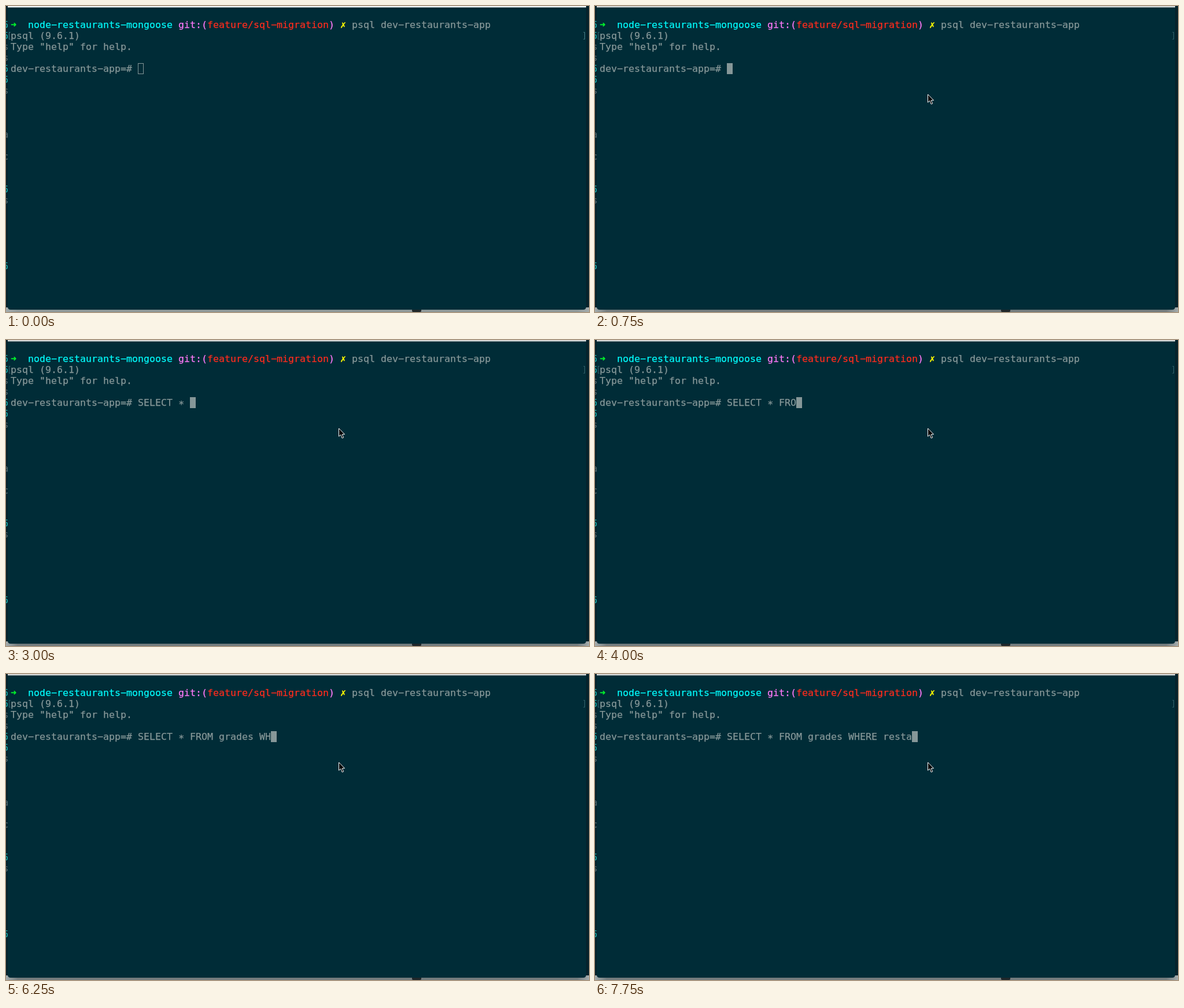
An HTML page that plays this animation: 1008x530 px, repeating every 8000 ms.

```html
<!DOCTYPE html>
<html lang="en">
<head>
<meta charset="utf-8">
<title>Terminal query</title>
<style>
  html, body { margin: 0; width: 100%; height: 100%; overflow: hidden; background: #06222b; }
  svg { display: block; width: 100%; height: 100%; }
  text {
    font: 16.61px "DejaVu Sans Mono", "Liberation Mono", monospace;
    white-space: pre;
    fill: currentColor;
    stroke: currentColor;
    stroke-width: 0.25px;
  }
</style>
</head>
<body>
<svg id="stage" viewBox="0 0 1008 530" preserveAspectRatio="none">
  <linearGradient id="shade">
    <stop offset="0" stop-color="#a4acad"/>
    <stop id="shadeLeft" offset="0.02"/>
    <stop id="shadeRight" offset="0.98"/>
    <stop offset="1" stop-color="#a4acad"/>
  </linearGradient>
</svg>
<script>
const LOOP = 8000;
const LEFT = 8, TOP = 23, CELL = 10, ROW = 19, BASELINE = 15;
const GREY = "#869798", CYAN = "#00fbfb", PINK = "#ff78f8";
const PROMPT = "dev-restaurants-app=# ";
const QUERY = "SELECT * FROM grades WHERE resta";

// Each burst: start time, then the typed length after every 250 ms tick.
const BURSTS = [
  [1250, 1, 2, 4, 5, 6],
  [2500, 7, 8, 9],
  [3750, 11, 12, 14, 15, 17],
  [5000, 18, 20, 21],
  [6250, 23, 25, 27, 29, 31],
  [7500, 32]
];
const POINTER_AT = 250, FOCUS_AT = 500;

const byId = id => document.getElementById(id);
const stage = byId("stage");

function setAttrs(el, attrs) {
  for (const key in attrs) el.setAttribute(key, attrs[key]);
}

function add(tag, attrs, content = "") {
  const el = document.createElementNS("http://www.w3.org/2000/svg", tag);
  setAttrs(el, attrs);
  el.textContent = content;
  return stage.appendChild(el);
}

const box = (x, y, width, height, fill, more) =>
  add("rect", { x, y, width, height, fill, ...more });

// The terminal face has wide dashes and a centred asterisk.
const glyphs = s => s.replace(/-/g, "\u2212").replace(/\*/g, "\u2217");

const put = (col, row, content, color = GREY) => add("text", {
  x: LEFT + col * CELL,
  y: TOP + row * ROW + BASELINE,
  color
}, glyphs(content));

const sliver = (row, content, color) =>
  add("text", { x: -5.5, y: TOP + row * ROW + BASELINE, color }, content);

// Slivers of the windows behind
box(0, 0, 1008, 530, "#06222b");
for (const row of [0, 1, 4, 5, 15, 22]) sliver(row, "5", "#17a5a5");
for (const row of [2, 3, 6, 16]) sliver(row, "s", "#4d6469");
sliver(10, "a", "#4d6469");
sliver(12, "c", "#4d6469");
box(0, 522, 1008, 8, "url(#shade)");
box(702, 524, 16, 6, "#20272a", { rx: 2 });

// Terminal window
add("path", { d: "M3 0H1003V521Q1003 526 998 526H8Q3 526 3 521Z", fill: "#002c37" });
const titleEdge = box(3, 0, 1000, 2.5, "none");
const marks = add("path", {
  d: "M7.5 45.5H5.5V57.5H7.5M998.5 45.5H1000.5V57.5H998.5",
  fill: "none"
});

put(0, 0, "➜", "#00f52c");
put(3, 0, "node-restaurants-mongoose", CYAN);
put(29, 0, "git:(", PINK);
put(34, 0, "feature/sql-migration", "#ff2c1e");
put(55, 0, ")", PINK);
put(57, 0, "✗", "#fffb00");
put(59, 0, "psql dev-restaurants-app");
put(0, 1, "psql (9.6.1)");
put(0, 2, 'Type "help" for help.');
put(0, 4, PROMPT);
const typed = put(PROMPT.length, 4, "");

const caret = box(0, 0, 0, 0, "none", { stroke: GREY });
const pointer = add("path", {
  d: "M575.5 153V167L578.7 164L581.2 170L583.6 169L581.2 163.3H585.5Z",
  fill: "#000", stroke: "#fff", "stroke-width": 1, "stroke-linejoin": "round"
});

function typedLength(t) {
  let length = 0;
  for (const [start, ...counts] of BURSTS) {
    if (t < start) break;
    length = counts[Math.min(counts.length - 1, Math.floor((t - start) / 250))];
  }
  return length;
}

function draw(t) {
  const focused = t >= FOCUS_AT;
  const length = typedLength(t);
  const inset = focused ? 0 : 0.5;
  const shade = focused ? "#737b7d" : "#8e9899";

  typed.textContent = glyphs(QUERY.slice(0, length));
  setAttrs(caret, {
    x: LEFT + (PROMPT.length + length) * CELL + inset,
    y: TOP + 4 * ROW + inset,
    width: CELL - 2 * inset,
    height: ROW - 2 * inset,
    fill: focused ? GREY : "none",
    "stroke-width": focused ? 0 : 1
  });
  setAttrs(pointer, { visibility: t >= POINTER_AT ? "visible" : "hidden" });
  setAttrs(titleEdge, { fill: focused ? "#d5d6d6" : "#f3f5f5" });
  setAttrs(marks, { stroke: focused ? "#37646d" : "#4a8088" });
  for (const id of ["shadeLeft", "shadeRight"]) setAttrs(byId(id), { "stop-color": shade });
}

const origin = performance.now();
function tick() {
  draw((performance.now() - origin) % LOOP);
  requestAnimationFrame(tick);
}
tick();
</script>
</body>
</html>
```
